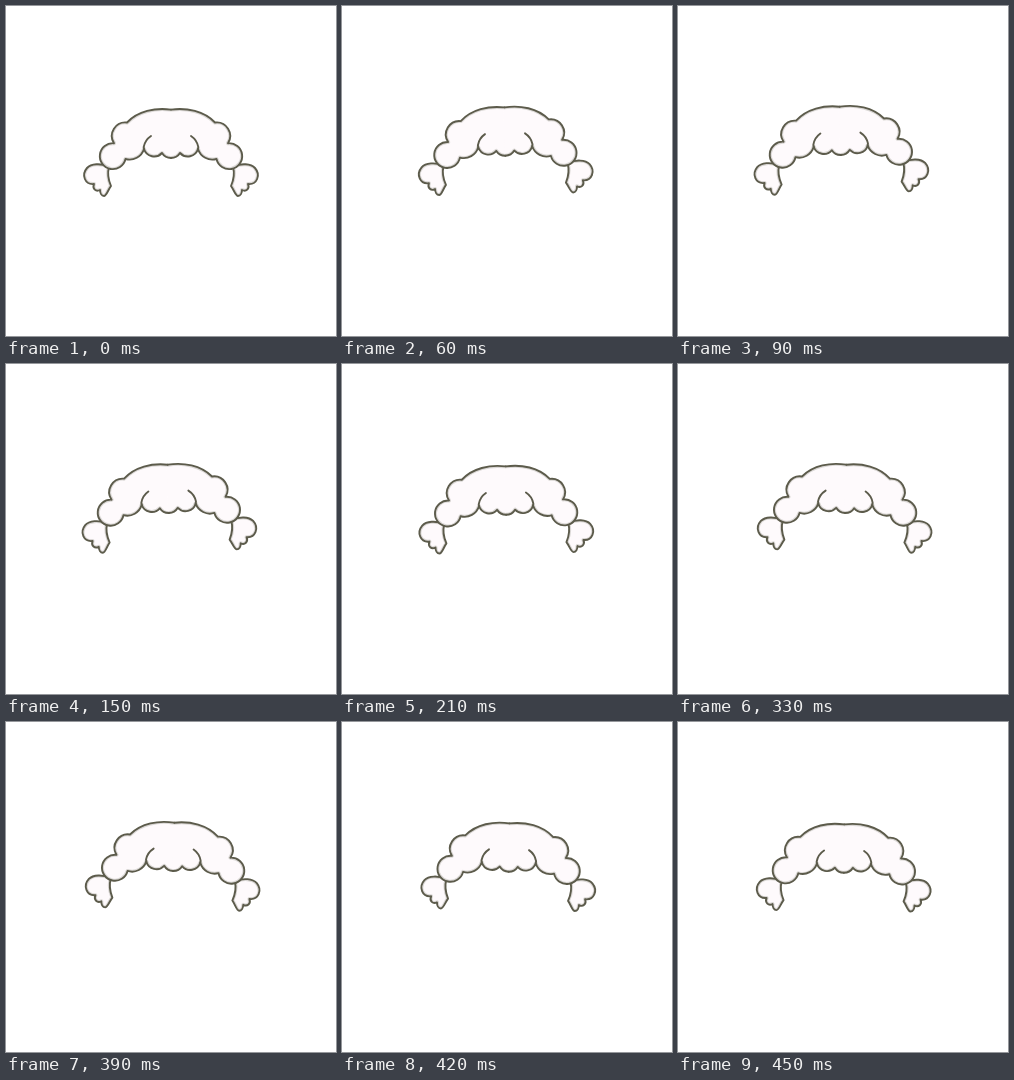
An HTML page with a canvas that plays this animation: 330x330 px, repeating every 480 ms.

```html
<!DOCTYPE html>
<html lang="en">
<head>
<meta charset="utf-8">
<title>Swaying wig</title>
<style>
  html, body { margin: 0; width: 100%; height: 100%; overflow: hidden; background: #fff; }
  canvas { display: block; }
</style>
</head>
<body>
<canvas id="stage" width="330" height="330"></canvas>
<script>
const ctx = document.getElementById('stage').getContext('2d');
const SIZE = 330, STEP = 30, STEPS = 16;
const PIVOT = { x: 165, y: 235 };
const SWAY = 0.027, LIFT = 3.2;
const INK = '#5c5b4b', SHADE = 'rgba(92, 91, 75, 0.22)', HAIR = '#fefafc';

// Left half of the wig, with x measured from the axis of symmetry.
const outline = `M0 103.600 C-16 101.500 -33 105 -44 116.500
  A13.5 13.5 0 0 0 -57 137.2
  A13 13 0 1 0 -45.5 153
  A15 15 0 0 0 -27 143
  A10.6 10.6 0 0 0 -9 147
  A10.6 10.6 0 0 0 0 152`;
const edge = new Path2D(outline);
const body = new Path2D(outline + ' H1 V103.6 Z');
const curl = new Path2D('M-20 130 Q-26 134 -27.300 141 L-27 143');
const tail = new Path2D(`M-63 160.5 C-70 157 -80 157.500 -84 162
  C-90 169 -86 179 -77 178
  C-79 183 -75 186 -71 184
  C-71 187 -69.500 190 -67 190
  C-64.500 190 -63 184 -60 180
  C-63 173 -64 168 -62 161`);

function bothSides(paint) {
  for (const side of [1, -1]) {
    ctx.save();
    ctx.scale(side, 1);
    paint();
    ctx.restore();
  }
}

function strokeLine(path, color, width) {
  ctx.strokeStyle = color;
  ctx.lineWidth = width;
  ctx.stroke(path);
}

// Fills a shape and softens the inner side of its outline.
function fillShaded(shape, line) {
  ctx.fill(shape);
  ctx.save();
  ctx.clip(shape);
  strokeLine(line, SHADE, 4);
  ctx.restore();
}

function draw(time) {
  const step = Math.floor(time / STEP) % STEPS;
  const swing = Math.sin(2 * Math.PI * step / STEPS);

  ctx.fillStyle = '#fff';
  ctx.fillRect(0, 0, SIZE, SIZE);
  ctx.save();
  ctx.translate(PIVOT.x, PIVOT.y - LIFT * Math.abs(swing));
  ctx.rotate(-SWAY * swing);
  ctx.translate(0, -PIVOT.y);

  ctx.fillStyle = HAIR;
  ctx.lineCap = ctx.lineJoin = 'round';

  bothSides(() => {
    fillShaded(tail, tail);
    strokeLine(tail, INK, 1.9);
  });
  bothSides(() => fillShaded(body, edge));
  bothSides(() => {
    strokeLine(edge, INK, 1.9);
    strokeLine(curl, INK, 1.9);
  });
  ctx.restore();
}

const start = performance.now();
function tick() {
  draw(performance.now() - start);
  requestAnimationFrame(tick);
}
tick();
</script>
</body>
</html>
```
